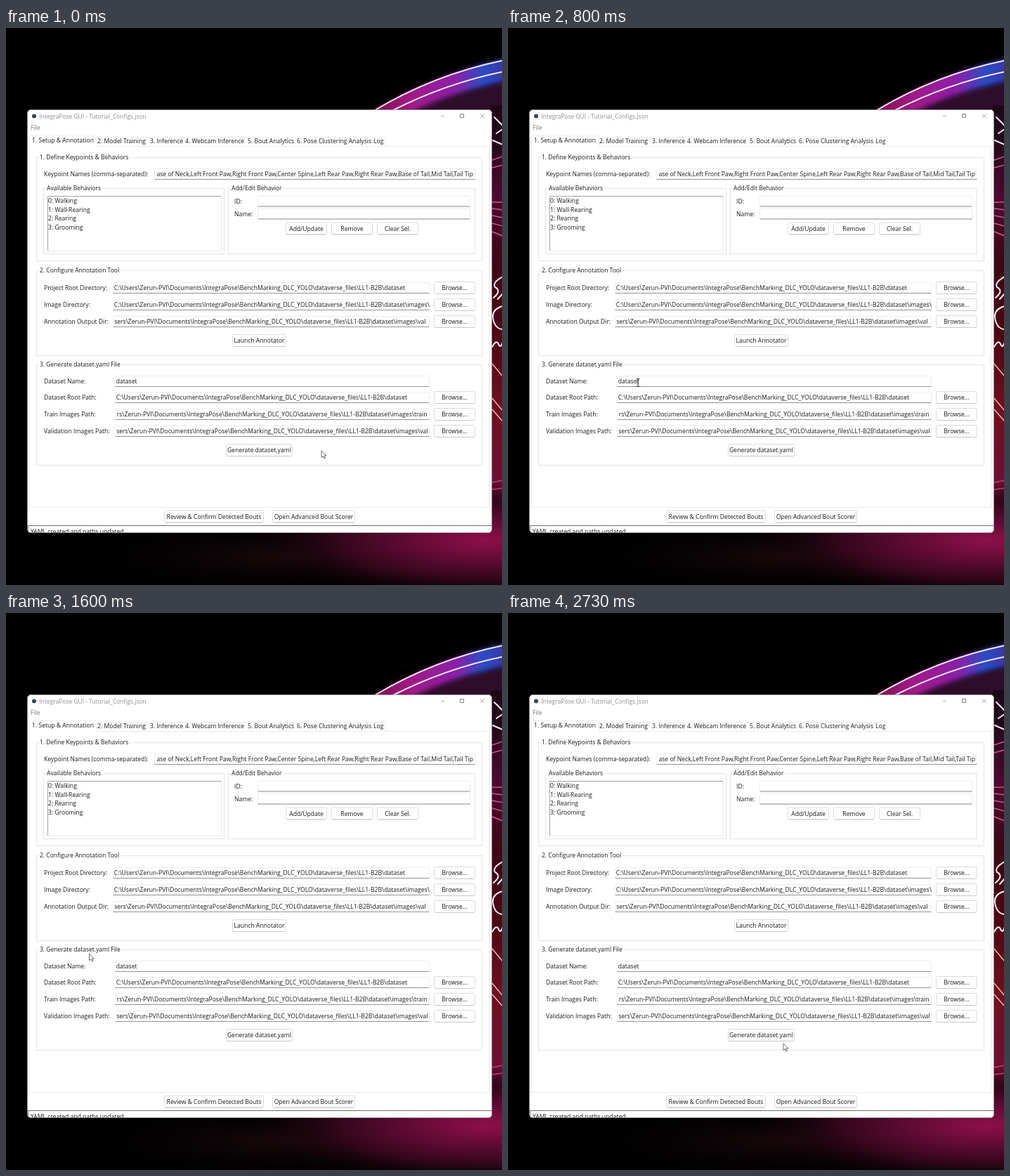
Recreate the animation shown at these times as an HTML page. Size 706x793 px, loop 2.8 s.

```html
<!DOCTYPE html>
<html lang="en">
<head>
<meta charset="utf-8">
<title>Dataset setup</title>
<style>
  html, body { margin: 0; width: 100%; height: 100%; overflow: hidden; background: #000; }
  svg { display: block; width: 706px; height: 793px; }
  text { font: 8.6px "Open Sans", "Noto Sans", sans-serif; fill: #1a1a1a; white-space: pre; }
  .caption { font-size: 8.45px; fill: #8e8e8e; }
  .title { font-size: 8.5px; paint-order: stroke; stroke: #fff; stroke-width: 5px; }
  .neon { fill: none; stroke-linecap: round; stroke-linejoin: round; }
</style>
</head>
<body>
<svg viewBox="0 0 706 793" xmlns="http://www.w3.org/2000/svg">
  <defs>
    <linearGradient id="ring" gradientUnits="userSpaceOnUse" x1="520" y1="0" x2="706" y2="0">
      <stop offset="0" stop-color="#7c1048"/>
      <stop offset=".3" stop-color="#a01a86"/>
      <stop offset=".65" stop-color="#8a20a8"/>
      <stop offset=".86" stop-color="#2a4cc4"/>
      <stop offset="1" stop-color="#3a38a8"/>
    </linearGradient>
    <linearGradient id="wall" gradientUnits="userSpaceOnUse" x1="0" y1="80" x2="0" y2="720">
      <stop offset="0" stop-color="#1c0618"/>
      <stop offset=".12" stop-color="#220818"/>
      <stop offset=".25" stop-color="#4c0a30"/>
      <stop offset=".4" stop-color="#3c0714"/>
      <stop offset=".58" stop-color="#500815"/>
      <stop offset=".72" stop-color="#70101e"/>
      <stop offset=".88" stop-color="#700d34"/>
      <stop offset="1" stop-color="#8c1046"/>
    </linearGradient>
    <radialGradient id="floor">
      <stop offset="0" stop-color="#8e1048"/>
      <stop offset=".3" stop-color="#640b36"/>
      <stop offset=".65" stop-color="#300619"/>
      <stop offset="1" stop-color="#0a0205" stop-opacity="0"/>
    </radialGradient>
    <radialGradient id="haze">
      <stop offset="0" stop-color="#1a090c"/>
      <stop offset="1" stop-color="#000" stop-opacity="0"/>
    </radialGradient>
    <filter id="soft" x="-20%" y="-20%" width="140%" height="140%"><feGaussianBlur stdDeviation="3"/></filter>
    <clipPath id="frame"><rect x="30.3" y="116.3" width="661.4" height="602.4" rx="5"/></clipPath>
  </defs>
  <rect width="706" height="793"/>
  <g id="backdrop">
    <path d="M565 122Q640 88 712 76V125H565Z" fill="#2e0a2c" filter="url(#soft)"/>
    <rect x="690" y="110" width="16" height="612" fill="url(#wall)"/>
    <path d="M520 120Q610 66 712 43V76Q640 90 578 120Z" fill="url(#ring)" filter="url(#soft)"/>
    <path d="M526 117Q610 67 706 46V66Q630 82 556 117Z" fill="url(#ring)"/>
    <ellipse cx="400" cy="752" rx="330" ry="60" fill="url(#haze)"/>
    <ellipse cx="680" cy="730" rx="330" ry="85" fill="url(#floor)"/>
    <g class="neon" stroke="#f6e6f4" stroke-width="2">
      <path d="M525 117Q610 66 708 46M549 118Q625 79 708 62"/>
      <path d="M695 127L707 139M698 150L707 144M693 160L707 166"/>
      <path d="M707 354Q692 362 696 369Q706 374 694 384M707 378L700 386"/>
      <path d="M707 396Q692 400 693 412Q695 428 707 429M692 454Q698 443 701 450T707 447"/>
    </g>
    <g class="neon" stroke="#d8508c" stroke-width="1.5">
      <path d="M692 188L707 183M692 199L707 195M692 248H707M692 257L707 259M692 267L707 270M692 278L707 282M692 290L707 296"/>
      <path d="M692 478L707 496M692 527L707 545M692 543L707 560" stroke="#f0b6b8"/>
      <path d="M692 647L707 644M692 657L707 655" stroke="#c04070"/>
    </g>
  </g>
  <g id="app" clip-path="url(#frame)">
    <rect x="30" y="116" width="662" height="603" fill="#fff"/>
  </g>
  <rect x="30.5" y="116.5" width="661" height="602" rx="5" fill="none" stroke="#8a8488" stroke-width=".7"/>
  <g id="arrow">
    <path d="M0 0V9.6L2.3 7.5L3.9 11L5.5 10.3L3.9 6.9H7Z" fill="#fff" stroke="#444" stroke-width=".8" stroke-linejoin="round"/>
  </g>
  <path id="beam" d="M-2.5-5.5H-.7L0-5L.7-5.5H2.5M0-5V5M-2.5 5.5H-.7L0 5L.7 5.5H2.5" fill="none" stroke="#222"/>
</svg>
<script>
const LOOP = 2800;
const app = document.getElementById('app');
const arrow = document.getElementById('arrow');
const beam = document.getElementById('beam');
const entries = [];

function add(tag, attrs, content = '') {
  const el = document.createElementNS('http://www.w3.org/2000/svg', tag);
  for (const key in attrs) el.setAttribute(key, attrs[key]);
  el.textContent = content;
  return app.appendChild(el);
}

// Text is placed by the vertical middle of its line.
const text = (x, mid, str, extra = {}) => add('text', { x, y: mid + 3, ...extra }, str);

const line = (d, stroke = '#ececec', width = 1) =>
  add('path', { d, stroke, 'stroke-width': width, fill: 'none' });

function group(x, y, right, bottom, title) {
  add('rect', {
    x: x + .5, y: y + .5, width: right - x - 1, height: bottom - y - 1,
    fill: 'none', stroke: '#e8e8e8', 'stroke-width': 1.4
  });
  text(x + 5, y, title, { class: 'title' });
}

function entry(x, mid, right, str = '', alignEnd = 0) {
  const top = mid - 7.5;
  add('rect', { x: x + .5, y: top, width: right - x - 1, height: 15, rx: 1, fill: '#fff', stroke: '#ededed' });
  line(`M${x + .5} ${mid + 7.5}H${right - .5}`, '#929292');
  if (alignEnd) text(alignEnd, mid, str, { 'text-anchor': 'end' });
  else text(x + 1.7, mid, str);
  entries.push({ x, right, top, bottom: mid + 8 });
}

function button(x, mid, right, label) {
  add('rect', { x: x + .5, y: mid - 8.5, width: right - x - 1, height: 17, rx: 2, fill: '#fefefe', stroke: '#dcdcdc' });
  line(`M${x + 2} ${mid + 8.5}H${right - 2}`, '#c8c8c8');
  text((x + right) / 2, mid, label, { 'text-anchor': 'middle' });
}

function buildWindow() {
  // Title bar and menu
  add('circle', { cx: 40, cy: 125.5, r: 3, fill: '#34465c' });
  text(47.5, 125.5, 'IntegraPose GUI - Tutorial_Configs.json', { class: 'caption' });
  line('M619 125.5H624', '#999', .8);
  line('M646.5 122.5H651.5V127.5H646.5Z', '#777', .9);
  line('M675 122.5L680.5 128M680.5 122.5L675 128', '#888', .8);
  text(35, 142, 'File', { style: 'fill:#777' });

  // Notebook
  line('M33.5 168.5V682.5H687.5V168.5H129.5V153.5H33.5V168.5');
  line('M129.5 155.5H539.5V168');
  text(37, 160, '1. Setup & Annotation');
  [[130, '2. Model Training'], [205, '3. Inference'], [255, '4. Webcam Inference'],
   [344, '5. Bout Analytics'], [414, '6. Pose Clustering Analysis'], [523, 'Log']]
    .forEach(([x, name]) => text(x, 161, name));

  // Keypoints and behaviors
  group(43, 184, 678, 332, '1. Define Keypoints & Behaviors');
  text(54, 208, 'Keypoint Names (comma-separated):');
  entry(211, 208, 668, 'ase of Neck,Left Front Paw,Right Front Paw,Center Spine,Left Rear Paw,Right Rear Paw,Base of Tail,Mid Tail,Tail Tip', 665);
  group(53, 228, 311, 322, 'Available Behaviors');
  line('M306.5 239V317.5H59', '#e8e8e8');
  line('M59.5 317V239.5H306', '#a2a2a2');
  ['Walking', 'Wall-Rearing', 'Rearing', 'Grooming']
    .forEach((name, i) => text(60, 246 + i * 12.7, `${i}: ${name}`));
  group(316, 228, 668, 322, 'Add/Edit Behavior');
  text(325, 247, 'ID:');
  entry(358, 246.5, 661);
  text(325, 265, 'Name:');
  entry(358, 264.5, 661);
  button(398, 285.5, 457, 'Add/Update');
  button(463, 285.5, 522, 'Remove');
  button(528, 285.5, 587, 'Clear Sel.');

  // Paths
  const tail = ['Zerun-PVI', 'Documents', 'IntegraPose', 'BenchMarking_DLC_YOLO',
    'dataverse_files', 'LL1-B2B', 'dataset'].join('\\');
  const root = 'C:\\Users\\' + tail;
  const val = 'sers\\' + tail + '\\images\\val';
  const train = 'rs\\' + tail + '\\images\\train';

  function row(mid, label, x, str, alignEnd) {
    text(54, mid, label);
    entry(x, mid, 603, str, alignEnd);
    if (str !== 'dataset') button(609, mid, 668, 'Browse...');
  }

  group(43, 345, 678, 467, '2. Configure Annotation Tool');
  row(370, 'Project Root Directory:', 152, root);
  row(394, 'Image Directory:', 152, root + '\\images\\');
  row(418, 'Annotation Output Dir:', 152, val, 597.5);
  button(322, 445, 399, 'Launch Annotator');

  group(43, 479, 678, 623, '3. Generate dataset.yaml File');
  row(503, 'Dataset Name:', 155, 'dataset');
  row(526, 'Dataset Root Path:', 155, root);
  row(550, 'Train Images Path:', 155, train, 599.5);
  row(574, 'Validation Images Path:', 155, val, 600.5);
  button(313, 601, 408, 'Generate dataset.yaml');

  // Footer and status bar
  button(225, 695.5, 367, 'Review & Confirm Detected Bouts');
  button(379, 695.5, 497, 'Open Advanced Bout Scorer');
  line('M31 708.5H691', '#707070', 1.2);
  line('M31.5 708V719', '#8a8a8a');
  text(35, 717, 'YAML created and paths updated');
}

// Pointer stops: time, x, y
const stops = [
  [0, 449, 602], [130, 449, 602], [670, 206, 525], [930, 164, 485],
  [1200, 160, 482], [1870, 95.5, 487], [2270, 394, 615], [2530, 392, 613], [LOOP, 392, 613]
];
const ticks = [260, 200, 130, 60, 0];

// The screen refreshes five times per 400 ms, then rests.
function snap(t) {
  const phase = (t + 130) % 400;
  return Math.max(0, t - phase + ticks.find(tick => tick <= phase));
}

function pointerAt(t) {
  const i = stops.findIndex(stop => stop[0] > t);
  const [t0, x0, y0] = stops[i - 1];
  const [t1, x1, y1] = stops[i];
  const p = (t - t0) / (t1 - t0);
  const k = p * p * (3 - 2 * p);
  return [x0 + (x1 - x0) * k, y0 + (y1 - y0) * k];
}

function draw(t) {
  const [x, y] = pointerAt(snap(t));
  const typing = entries.some(e => x > e.x && x < e.right && y > e.top && y < e.bottom);
  const place = `translate(${x.toFixed(1)} ${y.toFixed(1)})`;
  arrow.setAttribute('transform', place);
  beam.setAttribute('transform', place);
  arrow.setAttribute('visibility', typing ? 'hidden' : 'visible');
  beam.setAttribute('visibility', typing ? 'visible' : 'hidden');
}

function tick() {
  draw(performance.now() % LOOP);
  requestAnimationFrame(tick);
}

buildWindow();
tick();
</script>
</body>
</html>
```
